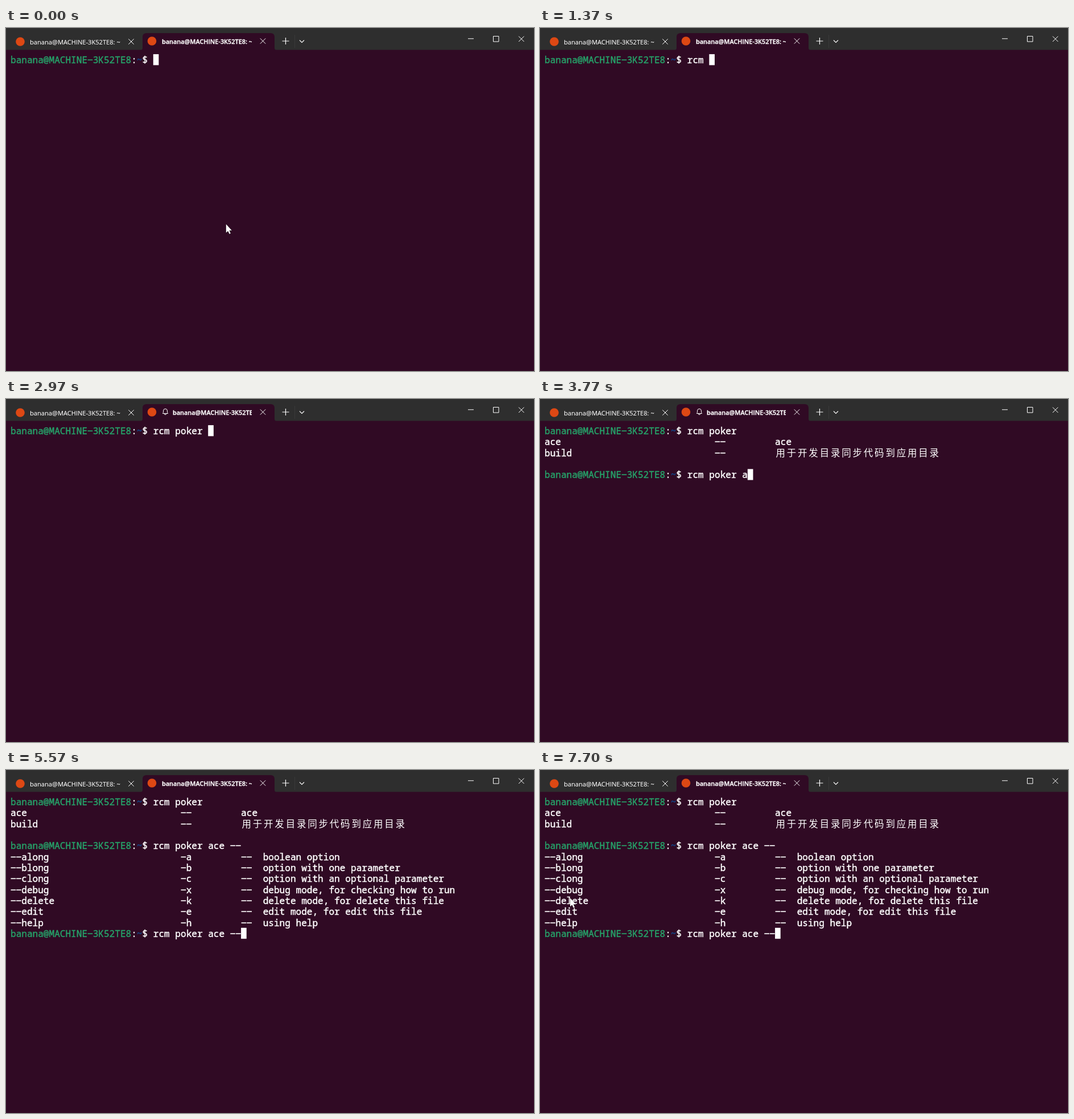
An HTML page with a canvas that plays this animation: 928x604 px, repeating every 8 s.

```html
<!DOCTYPE html>
<html lang="en">
<head>
<meta charset="utf-8">
<title>Terminal completion</title>
<style>
  html, body { margin: 0; width: 100%; height: 100%; overflow: hidden; background: #300a24; }
  canvas { display: block; }
</style>
</head>
<body>
<canvas id="stage" width="928" height="604"></canvas>
<script>
const ctx = document.getElementById('stage').getContext('2d');
const LOOP = 8000, CELL = 9.645, ROW = 19.315, LEFT = 8, TOP = 46.1;
const BG = '#300a24', BAR = '#2e2e2e', GREEN = '#26a269', BLUE = '#12488b', WHITE = '#fff';
const LOGO = '#dd4814';
const MONO = '16.07px "Noto Sans Mono", "DejaVu Sans Mono", monospace';
const CJK = '16.5px "Noto Sans CJK SC", "Noto Sans CJK", sans-serif';
const UI = '"Open Sans", "Noto Sans", sans-serif';
const USER = 'banana@MACHINE-3K52TE8';

// [time, text typed so far] for each prompt line
const FIRST = [[0, ''], [570, 'r'], [1040, 'rc'], [1170, 'rcm'], [1370, 'rcm '],
  [2300, 'rcm p'], [2570, 'rcm po'], [2700, 'rcm poker ']];
const SECOND = [[3170, 'rcm poker '], [3770, 'rcm poker a'], [4240, 'rcm poker ace '],
  [4500, 'rcm poker ace --']];
const THIRD = [[5570, 'rcm poker ace --']];

const COMMANDS = [['ace', 'ace'], ['build', '用于开发目录同步代码到应用目录']];
const OPTIONS = [
  ['along', 'a', 'boolean option'],
  ['blong', 'b', 'option with one parameter'],
  ['clong', 'c', 'option with an optional parameter'],
  ['debug', 'x', 'debug mode, for checking how to run'],
  ['delete', 'k', 'delete mode, for delete this file'],
  ['edit', 'e', 'edit mode, for edit this file'],
  ['help', 'h', 'using help']
];

// [time, x, y] of the pointer tip; without x it is hidden
const POINTER = [[0, 386.3, 345], [500], [6970, 330.3, 333], [7040, 318, 344], [7110, 270, 332],
  [7170, 200, 300], [7240, 130, 262], [7300, 80, 237], [7370, 47, 225], [7440, 52, 222],
  [7640, 52, 224], [7700, 52.5, 225]];

const latest = (steps, t) => steps.filter(s => s[0] <= t).pop();
const rowTop = row => TOP + row * ROW;

function put(row, col, text, color = WHITE) {
  const base = Math.round(rowTop(row)) + 16;
  ctx.fillStyle = ctx.strokeStyle = color;
  ctx.lineWidth = 0.45;
  for (const ch of text) {
    const x = LEFT + col * CELL;
    const wide = ch > '\u2e80';
    if (ch === '-') {
      ctx.fillRect(x + 0.5, base - 6.6, CELL - 0.9, 1.7);
    } else if (wide) {
      ctx.font = CJK;
      ctx.fillText(ch, x + CELL - 8.25, base - 0.5);
    } else if (ch !== ' ') {
      ctx.font = MONO;
      ctx.fillText(ch, x, base);
      ctx.strokeText(ch, x, base);
    }
    col += wide ? 2 : 1;
  }
}

function prompt(row, typed, active) {
  put(row, 0, USER, GREEN);
  put(row, 22, ':');
  put(row, 23, '~', BLUE);
  put(row, 24, '$ ' + typed);
  if (active) ctx.fillRect(LEFT + (26 + typed.length) * CELL, rowTop(row), CELL, ROW);
}

function line(d, x = 0, y = 0, width = 1) {
  ctx.save();
  ctx.translate(x, y);
  ctx.strokeStyle = WHITE;
  ctx.lineWidth = width;
  ctx.stroke(new Path2D(d));
  ctx.restore();
}

const cross = (x, y) => line('M-4.7-4.7L4.7 4.7M4.7-4.7L-4.7 4.7', x, y);

function disc(x, y) {
  ctx.fillStyle = LOGO;
  ctx.beginPath();
  ctx.arc(x, y, 7.8, 0, 2 * Math.PI);
  ctx.fill();
}

function label(x, y, right, font, stroke) {
  const text = USER + ': ~';
  ctx.save();
  ctx.beginPath();
  ctx.rect(x, 9, right - x, 28);
  ctx.clip();
  ctx.font = font + ' ' + UI;
  ctx.fillStyle = ctx.strokeStyle = WHITE;
  ctx.lineWidth = stroke;
  ctx.fillText(text, x, y);
  ctx.strokeText(text, x, y);
  ctx.restore();
}

function titleBar(bell) {
  ctx.fillStyle = BAR;
  ctx.fillRect(0, 0, 928, 38.5);
  ctx.fillStyle = BG;
  ctx.fill(new Path2D('M236 39Q240 39 240 35V16Q240 9 247 9H465Q472 9 472 16V35Q472 39 476 39Z'));

  disc(25, 24);
  label(42, 28.5, 206, '400 11.1px', 0.1);
  cross(220, 24);

  disc(256.5, 23);
  if (bell) line('M-4.5 3H4.5L3.5 1V-1.5A3.5 3.7 0 0 0-3.5-1.5V1ZM-1.6 3.5A1.6 1.6 0 0 0 1.6 3.5', 280, 22.5);
  label(bell ? 293 : 274, 27.5, 432, '600 10.9px', 0.35);
  cross(451.5, 23);

  line('M-6 0H6M0-6V6', 491.5, 23, 1.2);
  ctx.fillStyle = '#3a3a3a';
  ctx.fillRect(507, 12, 1, 23);
  line('M-4-2L0 2L4-2', 520, 23.5, 1.1);
  line('M812 18.8H822');
  line('M856.5 14.5H866V24H856.5Z');
  cross(905.8, 19.3);
}

function pointer(x, y) {
  ctx.save();
  ctx.translate(x, y);
  const arrow = new Path2D('M.5.5V15.5L3.9 12.4L6.3 17.8L8.5 16.8L6.2 11.6H10.6Z');
  ctx.fillStyle = WHITE;
  ctx.strokeStyle = '#000';
  ctx.lineWidth = 0.6;
  ctx.stroke(arrow);
  ctx.fill(arrow);
  ctx.restore();
}

function draw(t) {
  ctx.fillStyle = BG;
  ctx.fillRect(0, 0, 928, 604);
  titleBar(t >= 2970 && t < 5040);

  prompt(0, latest(FIRST, t)[1], t < 3170);
  if (t >= 3170) {
    COMMANDS.forEach(([name, about], i) => {
      put(i + 1, 0, name);
      put(i + 1, 31, '--');
      put(i + 1, 42, about);
    });
    prompt(4, latest(SECOND, t)[1], t < 5570);
  }
  if (t >= 5570) {
    OPTIONS.forEach(([name, key, about], i) => {
      put(i + 5, 0, '--' + name);
      put(i + 5, 31, '-' + key);
      put(i + 5, 42, '--  ' + about);
    });
    prompt(12, latest(THIRD, t)[1], true);
  }

  const [, x, y] = latest(POINTER, t);
  if (x !== undefined) pointer(x, y);
}

const start = performance.now();
function frame() {
  draw((performance.now() - start) % LOOP);
  requestAnimationFrame(frame);
}
frame();
</script>
</body>
</html>
```
